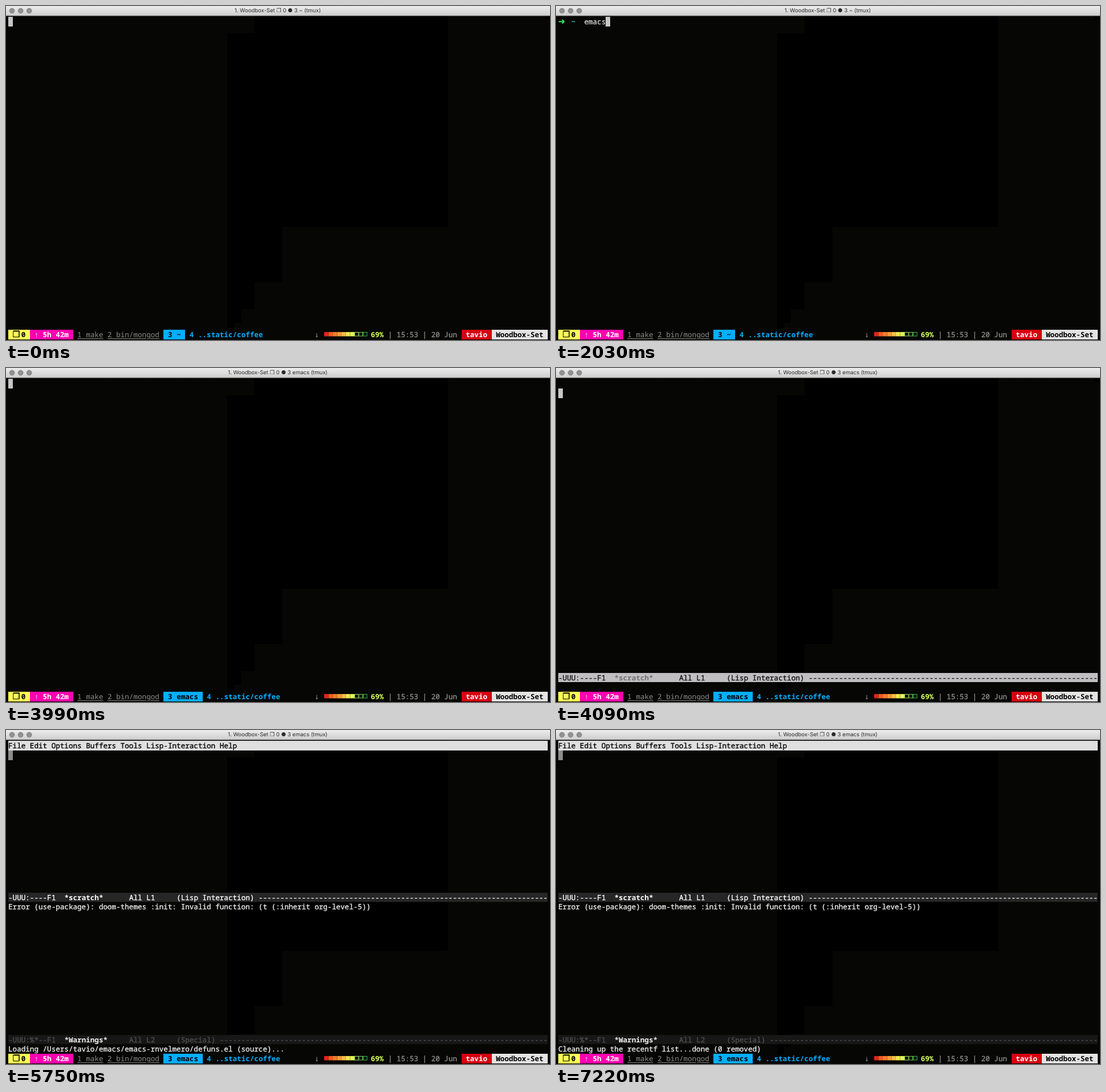
Write an HTML page that moves like this. It is 954 by 587 pixels and loops after 8000 ms.

```html
<!DOCTYPE html>
<html lang="en">
<head>
<meta charset="utf-8">
<title>Terminal</title>
<style>
  html, body { margin: 0; width: 100%; height: 100%; overflow: hidden; background: #060604; }
  #stage { position: relative; width: 954px; height: 587px; overflow: hidden; background: #060604; }
  svg { position: absolute; left: 0; top: 0; }
  #title {
    position: absolute; left: 0; top: 0; width: 953px; height: 17px;
    text-align: center; white-space: pre; color: #2b2b2b;
    font: 9.5px/18px Inter, "DejaVu Sans", sans-serif;
    text-rendering: geometricPrecision;
  }
  #screen span {
    position: absolute; height: 16.66px; white-space: pre;
    font: 500 12.613px/18.6px "Noto Sans Mono", "DejaVu Sans Mono", monospace;
    text-rendering: geometricPrecision; font-variant-ligatures: none;
    -webkit-text-stroke: .35px currentColor;
  }
  #screen .bold { font-weight: 700; -webkit-text-stroke: 0; }
  #screen .under { text-decoration: underline; text-underline-offset: 2px; -webkit-text-stroke: 0; }
  #screen .symbol { font-family: "DejaVu Sans", sans-serif; font-size: 14.5px; }
</style>
</head>
<body>
<div id="stage">
  <svg width="954" height="587">
    <defs>
      <linearGradient id="bar" x2="0" y2="1">
        <stop stop-color="#ececec"/><stop offset="1" stop-color="#cecece"/>
      </linearGradient>
    </defs>
    <path d="M436 18H775V388H485V485H436V533H412V557H400V570H388V48H436ZM945 18h9v6h-9Z" fill="#000"/>
    <rect width="954" height="17" fill="url(#bar)"/>
    <rect y="16.5" width="954" height="1" fill="#a4a4a4"/>
    <g fill="#919191" stroke="#777" stroke-width=".8">
      <circle cx="10.5" cy="8.4" r="4.4"/>
      <circle cx="25.6" cy="8.4" r="4.4"/>
      <circle cx="40.7" cy="8.4" r="4.4"/>
    </g>
  </svg>
  <div id="title"></div>
  <div id="screen"></div>
  <svg id="battery" width="954" height="587"></svg>
</div>
<script>
const LOOP = 8000, COLS = 125, CELL_W = 7.568, CELL_H = 16.66, LEFT = 4, TOP = 19.2;
const HOST = 'Woodbox-Set', USER = 'tavio';
const CONFIG = `Loading /Users/${USER}/emacs/emacs-rnvelmero/`;
const RECENT = `Loading /Users/${USER}/.emacs.d/recentf...`;
const CLEANING = 'Cleaning up the recentf list...';

const typed = (time, command) => [time, { command, cursor: [0, 6 + command.length] }];

// Each step changes part of the screen state at its time.
const steps = [
  [0, { prompt: false, command: '', cursor: [0, 0], app: '~', view: 'shell', message: '' }],
  [110, { prompt: true, cursor: [0, 6] }],
  typed(1660, 'e'),
  typed(1750, 'em'),
  typed(1840, 'ema'),
  typed(1940, 'emac'),
  typed(2030, 'emacs'),
  typed(2240, 'emacs '),
  typed(2320, 'emacs -'),
  typed(2540, 'emacs -n'),
  typed(2640, 'emacs -nw'),
  [3420, { cursor: [1, 0] }],
  [3520, { app: 'emacs' }],
  [3830, { prompt: false, command: '' }],
  [3990, { cursor: [0, 0] }],
  [4090, { cursor: [1, 0], view: 'single' }],
  [5260, { message: CONFIG + 'custom.el (source)...' }],
  [5360, { message: CONFIG + 'custom.el (source)...done' }],
  [5750, { view: 'split', message: CONFIG + 'defuns.el (source)...' }],
  [5850, { message: CONFIG + 'defuns.el (source)...done' }],
  [6750, { message: RECENT }],
  [6850, { message: RECENT + 'done' }],
  [6950, { message: CLEANING }],
  [7220, { message: CLEANING + 'done (0 removed)' }]
];

const titleBox = document.getElementById('title');
const screenBox = document.getElementById('screen');

function put(row, col, text, color = '#d6d6d6', { bg, cls = '', cols } = {}) {
  const span = document.createElement('span');
  span.textContent = text;
  span.className = cls;
  span.style.left = LEFT + col * CELL_W + 'px';
  span.style.top = TOP + row * CELL_H + 'px';
  span.style.color = color;
  if (bg) {
    span.style.background = bg;
    span.style.width = (cols || text.length) * CELL_W + 'px';
  }
  screenBox.append(span);
}

const bold = { cls: 'bold' };
const symbol = { cls: 'symbol' };
const fill = (row, col, cols, bg) => put(row, col, '', '', { bg, cols });

function modeLine(row, { flags, name, line, mode, color, nameColor, bg }) {
  fill(row, 0, COLS, bg);
  put(row, 0, flags, color);
  put(row, 13, name, nameColor, bold);
  put(row, 28, 'All ' + line, color);
  put(row, 39, mode, color);
  const start = 40 + mode.length;
  put(row, start, '-'.repeat(COLS - start), color);
}

const scratch = { flags: '-UUU:----F1', name: '*scratch*', line: 'L1', mode: '(Lisp Interaction)' };
const warnings = { flags: '-UUU:%*--F1', name: '*Warnings*', line: 'L2', mode: '(Special)' };

function statusBar(app) {
  const row = 33, gray = '#8c8c8c', blue = '#00afff';
  fill(row, 0, 5, '#ffff55');
  put(row, 1, '❐', '#000', symbol);
  put(row, 3, '0', '#000', bold);
  fill(row, 5, 10, '#ff00af');
  put(row, 6, '↑', '#fff', bold);
  put(row, 8, '5h 42m', '#fff', bold);
  put(row, 16, '1 make', gray, { cls: 'under' });
  put(row, 23, '2 bin/mongod', gray, { cls: 'under' });
  const label = ` 3 ${app} `;
  put(row, 36, label, '#000', { bg: blue, cls: 'bold' });
  put(row, 37 + label.length, '4 ..static/coffee', blue, bold);
  put(row, 71, '↓', gray);
  put(row, 84, '69%', '#d7ff5f', bold);
  put(row, 88, '|', gray);
  put(row, 90, '15:53', gray);
  put(row, 96, '|', gray);
  put(row, 98, '20 Jun', gray);
  put(row, 105, ` ${USER} `, '#fff', { bg: '#d7000f', cls: 'bold' });
  put(row, 112, ` ${HOST} `, '#000', { bg: '#e4e4e4', cls: 'bold' });
}

function draw(s) {
  screenBox.replaceChildren();
  titleBox.textContent = `1. ${HOST} ❐ 0 ● 3 ${s.app} (tmux)`;
  if (s.prompt) {
    put(0, 0, '➜', '#35e35c', symbol);
    put(0, 3, '~', '#32dfdf', bold);
    put(0, 6, s.command);
  }
  if (s.view === 'single') {
    modeLine(31, { ...scratch, color: '#111', nameColor: '#727272', bg: '#c0bec0' });
  }
  if (s.view === 'split') {
    fill(0, 0, COLS, '#dfdfdf');
    put(0, 0, 'File Edit Options Buffers Tools Lisp-Interaction Help', '#000');
    modeLine(16, { ...scratch, color: '#fff', nameColor: '#fff', bg: '#262626' });
    put(17, 0, 'Error (use-package): doom-themes :init: Invalid function: (t (:inherit org-level-5))', '#f0f0f0');
    modeLine(31, { ...warnings, color: '#505050', nameColor: '#f0f0f0', bg: '#171717' });
  }
  put(32, 0, s.message, '#f0f0f0');
  fill(...s.cursor, 1, s.view === 'split' ? '#8d8d8d' : '#c7c7c7');
  statusBar(s.app);
}

const charge = ['#e3231b', '#ee5a24', '#f47b2c', '#f99a36', '#f7bd45', '#f3e650', '#dcf658'];
const empty = ['#b5dc55', '#62cf55', '#35c24e'];
document.getElementById('battery').innerHTML = [...charge, ...empty].map((color, i) => {
  const inside = i < charge.length ? color : 'none';
  return `<rect x="${558.5 + i * CELL_W}" y="573.5" width="6.5" height="6.5" fill="${inside}" stroke="${color}"/>`;
}).join('');

const begin = performance.now();
let shown = 0;
function tick() {
  const time = (performance.now() - begin) % LOOP;
  const count = steps.filter(([at]) => at <= time).length;
  if (count !== shown) {
    shown = count;
    draw(Object.assign({}, ...steps.slice(0, count).map(([, change]) => change)));
  }
  requestAnimationFrame(tick);
}
tick();
</script>
</body>
</html>
```
